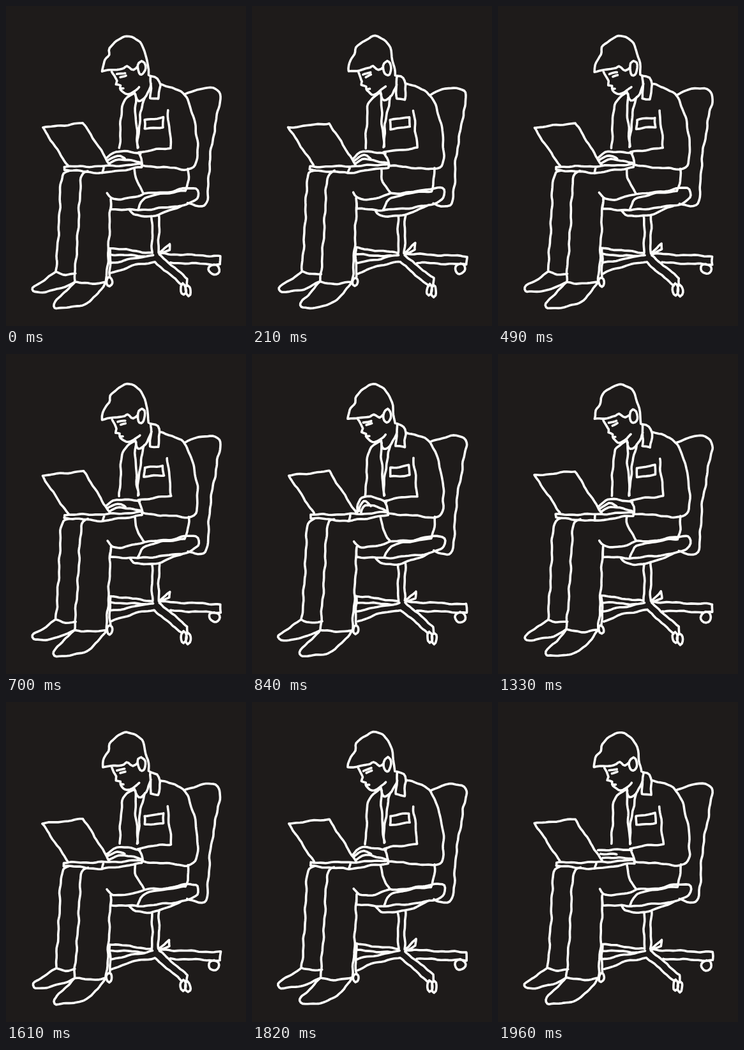
An HTML page for the animation above (2.03 s loop, 376 px wide and 500 px high).

```html
<!DOCTYPE html>
<html lang="en">
<head>
<meta charset="utf-8">
<title>Man typing on a laptop</title>
<style>
  html, body { margin: 0; width: 100%; height: 100%; overflow: hidden; background: #1e1b1a; }
  svg { display: block; width: 100%; height: 100%; }
  path { fill: none; stroke: #fcfcfa; stroke-width: 3.6; stroke-linecap: round; stroke-linejoin: round; }
</style>
</head>
<body>
<svg viewBox="0 0 376 500"><path id="ink"/></svg>
<script>
const STEP = 70, COUNT = 29, WOBBLE = 0.7;
const ink = document.getElementById('ink');

const point = (x, y, sharp = false) => ({ x, y, sharp });
const mix = (a, b, t) => a + (b - a) * t;
const between = (a, b, t, dx = 0, dy = 0) => point(mix(a.x, b.x, t) + dx, mix(a.y, b.y, t) + dy);

// Key points of a stroke; "!" marks a sharp corner.
const stroke = text => text.split(' ').map(item => {
  const [x, y] = item.split(',').map(parseFloat);
  return point(x, y, item.endsWith('!'));
});

function oval(cx, cy, rx, ry) {
  return Array.from({ length: 9 }, (_, i) => {
    const a = i * Math.PI / 4;
    return point(cx + rx * Math.sin(a), cy - ry * Math.cos(a));
  });
}

function trouser(knee, foot, cuff) {
  return [
    between(knee, knee, 0, 12, -11), between(knee, knee, 0, 4, -7), between(knee, knee, 0, 0, 8),
    between(knee, foot, 0.5, 1), { ...foot, sharp: true }, between(foot, cuff, 0.5, 0, 3), cuff
  ];
}

function shoe(ankle, toe, heel, depth) {
  return [
    ankle, between(ankle, toe, 0.5, 0, -1), between(toe, toe, 0, 0, -3),
    between(toe, toe, 0, 4, 4), between(toe, heel, 0.6, 2, depth), heel
  ];
}

// lift: 0 rests on the keys, 1 arches the fingers, -1 lays them flat.
function hand(lift) {
  const arch = 8 + 8 * lift;
  return [0, 1, 2].map(i => {
    const y = 231 + 6 * i;
    return [
      point(157 + 3 * i + 7 * Math.max(lift, 0), y + arch / (i + 1)),
      point(173 + 2 * i, y - arch * 0.45),
      point(i === 1 ? 186 : 210, y + i)
    ];
  });
}

const farFoot = point(78, 415), farCuff = point(109, 418);
const nearFoot = point(107, 431), nearCuff = point(157, 431);

const head = [
  '151,102! 153,88 161,76 163,65 177,53 193,47 214,62 224,108',
  '151,102 168,100 185,97 190,94 199,100 205,96',
  '166,103 173,117! 172,123! 179,125! 180,131 191,138 209,126',
  '174,107 186,104', '179,111 187,108', '179,129 184,129'
].map(stroke).concat([oval(212, 97, 6, 11)]);

const jacket = [
  '226,109 237,113 241,124! 239,146! 226,144! 227,109',
  '227,122 219,140 207,148 202,135',
  '202,135 184,150 180,180 178,222',
  '203,138 203,170 207,220', '217,142 210,175 206,221',
  '241,122 277,137 295,180 300,225 294,252 260,253 214,249',
  '253,163 259,222! 222,226 207,229! 212,238 214,249',
  '217,178! 246,174! 247,189! 217,192! 217,178'
].map(stroke);

const laptop = [
  '57,190! 121,183! 163,249', '57,190 97,249',
  '91,251! 163,250 213,247! 213,252! 151,261! 91,256! 91,251', '151,261 153,253'
].map(stroke);

const legs = [
  '157,431 160,390 164,302', '159,292 168,301 190,301 217,293',
  '202,254 204,271 217,293', '286,254 285,274 281,289'
].map(stroke).concat([
  trouser(point(86, 268), farFoot, farCuff),
  trouser(point(117, 269), nearFoot, nearCuff),
  shoe(farFoot, point(42, 443), point(107, 431), 6),
  shoe(nearFoot, point(75, 468), nearCuff, 18)
]);

const chair = [
  '280,138 312,128 334,135 331,168 320,235 316,290 310,312 284,308',
  '217,293 250,291 298,285 300,300 278,311 206,319! 218,300 281,289',
  '164,301 164,317! 206,319', '193,319 202,327 235,327 277,311',
  '229,328 229,385', '240,327 239,386',
  '163,378 229,386', '163,388 218,391', '163,402 230,389', '166,418 198,406 233,400',
  '163,378 163,424', '240,386 256,371! 256,381! 243,387',
  '240,387 336,391! 336,404! 258,401',
  '240,389 284,426! 284,436', '233,400 276,437'
].map(stroke).concat([
  oval(162, 431, 4, 7), oval(278, 443, 4, 9), oval(285, 445, 4, 9), oval(326, 411, 8, 8)
]);

const figure = [...head, ...jacket, ...laptop, ...legs, ...chair];

function random(seed) {
  const n = Math.sin(seed * 78.233 + 4.7) * 43758.5453;
  return n - Math.floor(n);
}

// A smooth field redrawn each frame, so strokes that meet stay joined.
function wobbler(frame) {
  const phase = [1, 2, 3, 4].map(k => 2 * Math.PI * random(frame * 4 + k));
  return (x, y) => {
    const dx = Math.sin(x * 0.09 + y * 0.14 + phase[0]) + 0.6 * Math.sin(x * 0.31 - y * 0.27 + phase[1]);
    const dy = Math.sin(x * 0.13 - y * 0.08 + phase[2]) + 0.6 * Math.sin(x * 0.29 + y * 0.33 + phase[3]);
    return `${(x + WOBBLE * dx).toFixed(1)} ${(y + WOBBLE * dy).toFixed(1)}`;
  };
}

function heading(pts, i) {
  if (!i || i === pts.length - 1 || pts[i].sharp) return point(0, 0);
  const dx = pts[i + 1].x - pts[i - 1].x, dy = pts[i + 1].y - pts[i - 1].y;
  const length = Math.hypot(dx, dy) || 1;
  return point(dx / length, dy / length);
}

function strokePath(pts, place) {
  let d = 'M' + place(pts[0].x, pts[0].y);
  for (let i = 1; i < pts.length; i++) {
    const a = pts[i - 1], b = pts[i];
    const ha = heading(pts, i - 1), hb = heading(pts, i);
    const length = Math.hypot(b.x - a.x, b.y - a.y), reach = length / 3;
    const bend = (axis, t) => {
      const u = 1 - t;
      return u * u * u * a[axis] + 3 * u * u * t * (a[axis] + reach * ha[axis]) +
        3 * u * t * t * (b[axis] - reach * hb[axis]) + t * t * t * b[axis];
    };
    const parts = Math.ceil(length / 4);
    for (let k = 1; k <= parts; k++) d += 'L' + place(bend('x', k / parts), bend('y', k / parts));
  }
  return d;
}

function draw(frame) {
  // Two beats of every eight move the fingers: up early in the loop, flat later.
  const moving = frame % 8 === 4 || frame % 8 === 5;
  const lift = moving ? (frame < COUNT / 2 ? 1 : -1) : 0;
  const place = wobbler(frame);
  ink.setAttribute('d', [...figure, ...hand(lift)].map(s => strokePath(s, place)).join(''));
}

let shown = -1;
function tick() {
  const frame = Math.floor(performance.now() / STEP) % COUNT;
  if (frame !== shown) draw(shown = frame);
  requestAnimationFrame(tick);
}
tick();
</script>
</body>
</html>
```
